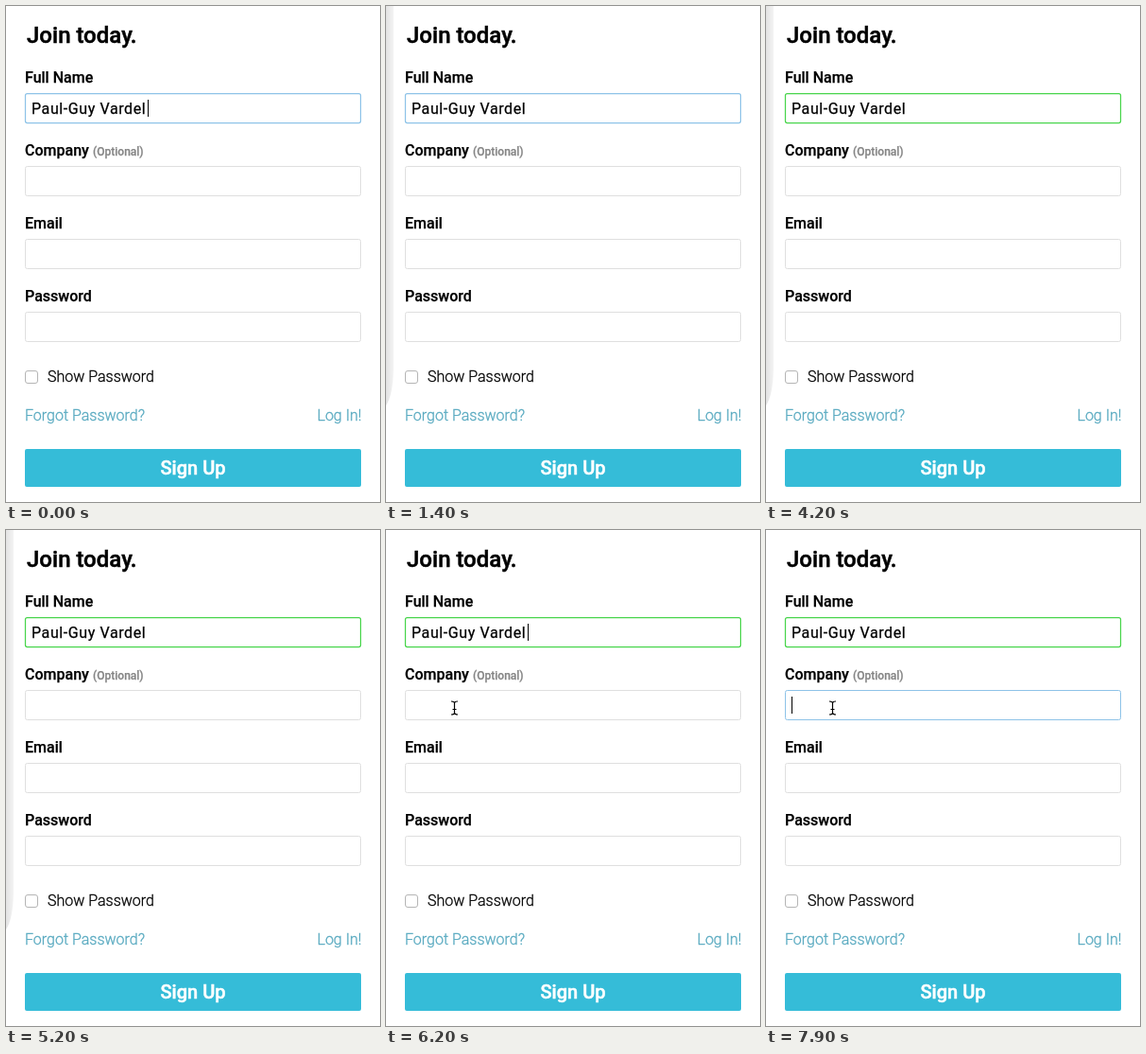
Animation of 396x524 px, one loop 8 s. Source, as an HTML page:

```html
<!DOCTYPE html>
<html lang="en">
<head>
<meta charset="utf-8">
<title>Sign up form</title>
<style>
  html, body { margin: 0; width: 100%; height: 100%; overflow: hidden; background: #fff; }
  svg { display: block; width: 396px; height: 524px; font-family: Roboto, Arial, sans-serif; font-size: 16px; }
  text { color: #000; fill: currentColor; stroke: currentColor; stroke-width: .25; }
  .strong { font-weight: 500; }
  .big { stroke-width: .5; }
  .thin { font-weight: 300; stroke-width: .3; }
  .link { color: #55a8bf; }
  .note { color: #858585; }
  .white { color: #fff; }
  .field { fill: #fff; stroke: #dfdfdf; }
  .caret { stroke: #000; stroke-width: 1; }
</style>
</head>
<body>
<svg viewBox="0 0 396 524">
  <defs>
    <linearGradient id="fade">
      <stop offset="0" stop-color="#e3e3e3"/>
      <stop offset="1" stop-color="#f3f3f3"/>
    </linearGradient>
  </defs>
  <path id="shade" fill="url(#fade)" d="M0 0H8V385Q7 412 0 422Z"/>

  <text class="strong big" x="22" y="39" font-size="24">Join today.</text>
  <g id="fields"></g>
  <text class="strong note" x="92" y="158" font-size="12">(Optional)</text>
  <text x="27" y="114" letter-spacing=".6">Paul-Guy Vardel</text>
  <path id="nameCaret" class="caret" d="M150.5 99V117"/>
  <path id="firmCaret" class="caret" d="M27.5 176V194"/>

  <rect x="20.5" y="385.5" width="13" height="13" rx="2.5" fill="#fff" stroke="#b5b5b5"/>
  <text class="thin" x="44" y="397">Show Password</text>
  <text class="thin link" x="20" y="438">Forgot Password?</text>
  <text class="thin link" x="376.3" y="438" text-anchor="end">Log In!</text>
  <rect x="20" y="468" width="356" height="40" rx="2" fill="#35bcd8"/>
  <text class="strong big white" x="198" y="495" font-size="20" text-anchor="middle">Sign Up</text>

  <path id="arrow" d="M0 0V14L3.2 11L5.6 16.3L8 15.2L5.7 10.2H10Z" stroke="#fff" stroke-width=".8"/>
  <path id="beam" fill="none" stroke="#000" stroke-width="1.2"
    d="M-3.5 -7Q0 -7 0 -5Q0 -7 3.5 -7M0 -5V5M-3.5 7Q0 7 0 5Q0 7 3.5 7M-2 1.5H2"/>
</svg>
<script>
const LOOP = 8000, STEP = 100;
const LEAVE = 1400, RETURN = 6200, CLICK = 7600, FADE = 300;
const GREY = [223, 223, 223], BLUE = [142, 195, 232], GREEN = [72, 213, 76];
const $ = id => document.getElementById(id);

$('fields').innerHTML = ['Full Name', 'Company', 'Email', 'Password'].map((label, i) => `
  <text class="strong" x="20" y="${81 + i * 77}">${label}</text>
  <rect class="field" x="20.5" y="${92.5 + i * 77}" width="355" height="31" rx="2"/>`).join('');
const [nameBox, firmBox] = document.querySelectorAll('.field');
nameBox.style.strokeWidth = 1.25;

// time, shape, x, y
const pointer = [
  [0, '', 0, 0],
  [5600, 'arrow', 71, 180],
  [5700, 'arrow', 75, 186],
  [5900, 'arrow', 76, 187],
  [RETURN, 'beam', 72.5, 188],
  [7000, 'beam', 71.5, 188],
  [7100, 'beam', 70.5, 188]
];

const show = (id, on) => $(id).style.display = on ? '' : 'none';
const ramp = (t, from) => Math.min(1, Math.max(0, (t - from) / FADE));
const mix = (a, b, k) => `rgb(${a.map((v, i) => Math.round(v + (b[i] - v) * k))})`;

function draw(now) {
  const t = Math.floor(now % LOOP / STEP) * STEP;
  const away = t >= LEAVE && t < RETURN;

  nameBox.style.stroke = mix(BLUE, GREEN, ramp(t, LEAVE));
  firmBox.style.stroke = mix(GREY, BLUE, ramp(t, CLICK));
  show('shade', away);
  show('nameCaret', !away && t < CLICK);
  show('firmCaret', t >= CLICK);

  const [, shape, x, y] = pointer.filter(p => p[0] <= t).pop();
  for (const id of ['arrow', 'beam']) show(id, id === shape);
  if (shape) $(shape).setAttribute('transform', `translate(${x} ${y})`);
}

const start = performance.now();
function tick() {
  draw(performance.now() - start);
  requestAnimationFrame(tick);
}
tick();
</script>
</body>
</html>
```
